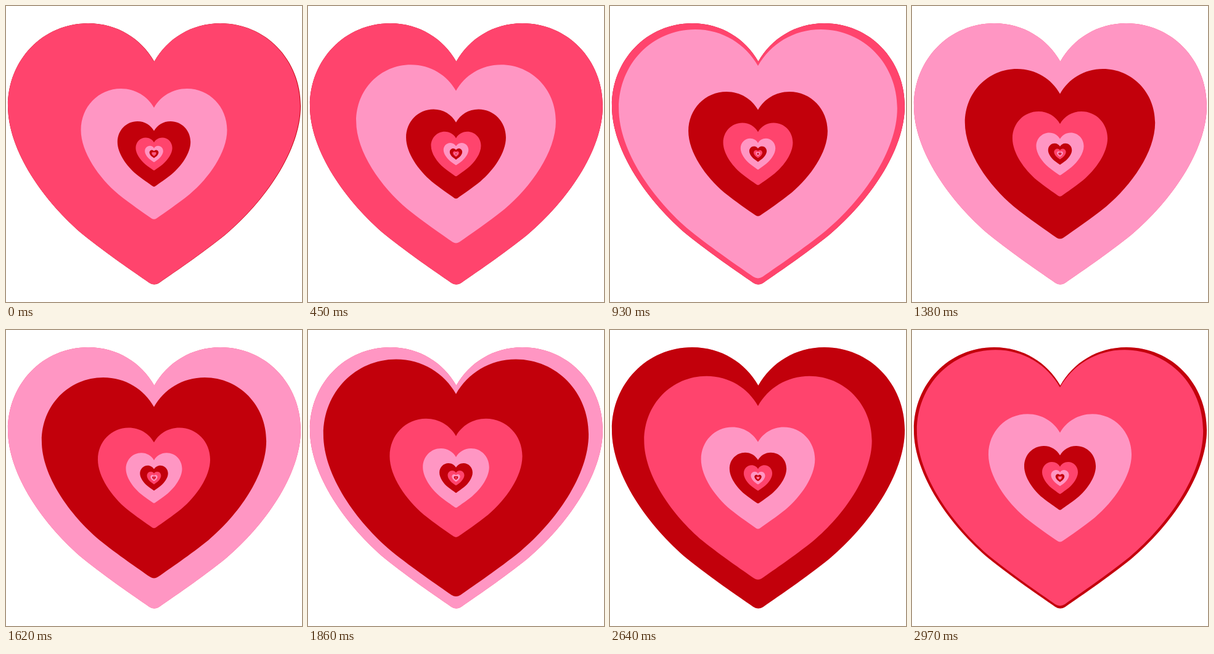
Write an HTML page with a canvas that moves like this. It is 480 by 480 pixels and loops after 3000 ms.

```html
<!DOCTYPE html>
<html lang="en">
<head>
<meta charset="utf-8">
<title>Endless hearts</title>
<style>
  html, body { margin: 0; width: 100%; height: 100%; overflow: hidden; background: #fff; }
  canvas { display: block; }
</style>
</head>
<body>
<canvas id="stage" width="480" height="480"></canvas>
<script>
const ctx = document.getElementById('stage').getContext('2d');
const COLORS = ['#ff446d', '#ff96c3', '#c2000b'];
const STEP = 30, DOUBLING = 1000, LOOP = 3000, LEVELS = 8;

// Heart around the stage centre (240, 240)
const heart = new Path2D(
  'M240 90C219 53 180 28 133 28C60 28 3 87 3 162C3 235 62 318 125 371' +
  'C165 403 205 430 232 449Q240 454 248 449' +
  'C275 430 315 403 355 371C418 318 477 235 477 162C477 87 420 28 347 28' +
  'C300 28 261 53 240 90Z');

// The outermost heart is a fixed window onto the growing ones
const windowPath = new Path2D();
windowPath.addPath(heart, new DOMMatrix([475 / 474, 0, 0, 1, -0.01, 0]));

function draw(time) {
  const turns = time / DOUBLING;
  const whole = Math.floor(turns);
  ctx.clearRect(0, 0, 480, 480);
  ctx.save();
  ctx.clip(windowPath);
  for (let n = -1; n <= LEVELS; n++) {
    const scale = 2 ** (turns - whole - n);
    ctx.save();
    ctx.translate(240, 240);
    ctx.scale(scale, scale);
    ctx.translate(-240, -240);
    ctx.fillStyle = COLORS[(n + whole + 3) % 3];
    ctx.fill(heart);
    ctx.restore();
  }
  ctx.restore();
}

function tick() {
  const time = performance.now() % LOOP;
  draw(Math.floor(time / STEP) * STEP);
  requestAnimationFrame(tick);
}
tick();
</script>
</body>
</html>
```
